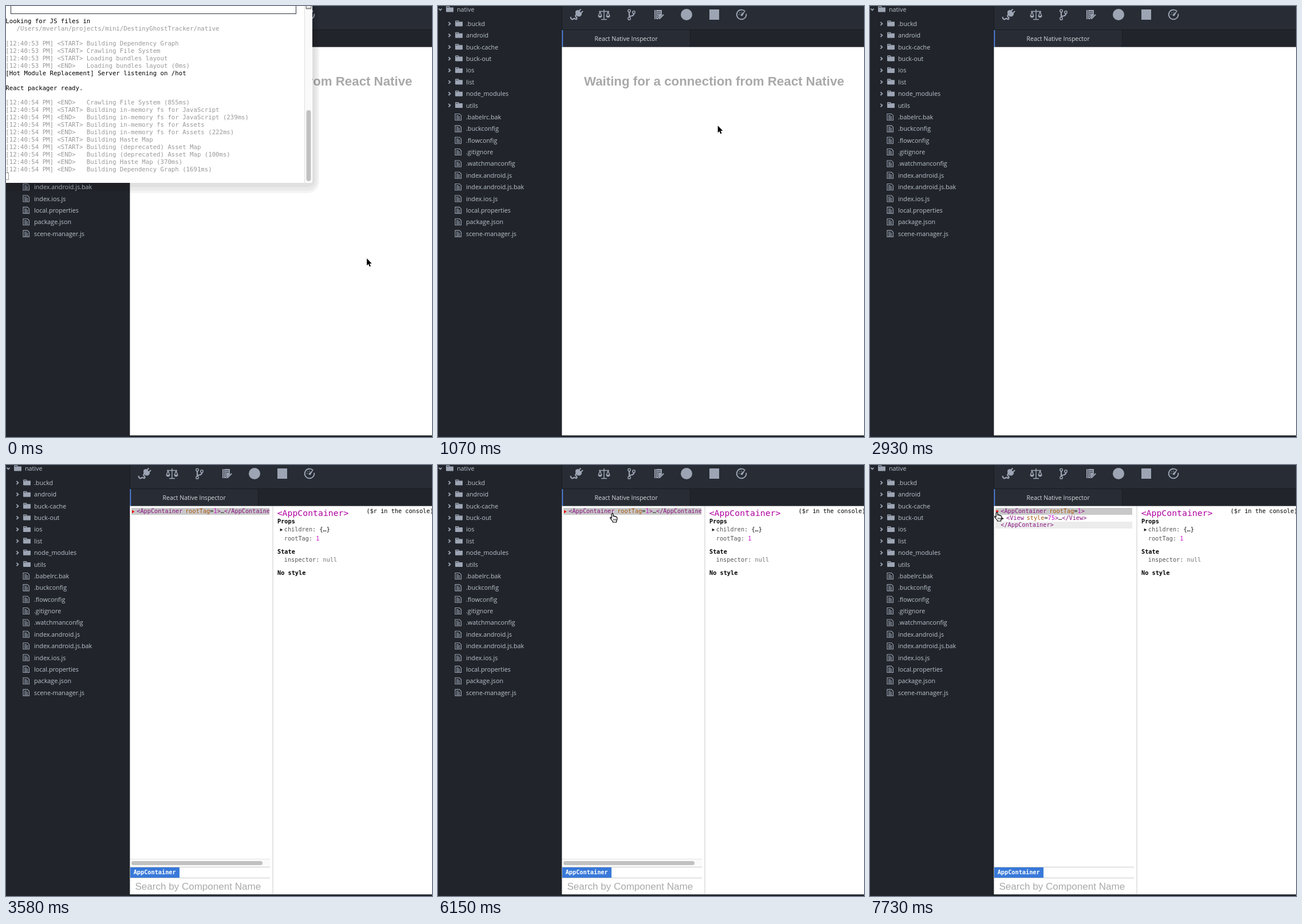
Recreate the animation shown at these times as an HTML page with a canvas. Size 744 px wide and 753 px high, loop 8000 ms.

```html
<!DOCTYPE html>
<html lang="en">
<head>
<meta charset="utf-8">
<title>Inspector</title>
<style>
html, body { margin: 0; width: 100%; height: 100%; overflow: hidden; background: #21252b; }
canvas { display: block; }
</style>
</head>
<body>
<canvas id="stage" width="744" height="753"></canvas>
<script>
const ctx = document.getElementById('stage').getContext('2d');
const LOOP = 8000;
const UI = '"Open Sans", "Noto Sans", sans-serif';
const MONO = '"DejaVu Sans Mono", monospace';
const SANS = '"Liberation Sans", Arial, sans-serif';
const CODE = `10.24px ${MONO}`;
const CODE_BOLD = `bold ${CODE}`;
const TAG = '#881280', ATTR = '#a85a10', VALUE = '#d010d0', ICON = '#9da5b4';

const FOLDERS = ['.buckd', 'android', 'buck-cache', 'buck-out', 'ios', 'list', 'node_modules', 'utils'];
const FILES = ['.babelrc.bak', '.buckconfig', '.flowconfig', '.gitignore', '.watchmanconfig',
  'index.android.js', 'index.android.js.bak', 'index.ios.js', 'local.properties',
  'package.json', 'scene-manager.js'];

// Lines starting with "!" are black
const LOG = `!Looking for JS files in
   /Users/mverlan/projects/mini/DestinyGhostTracker/native

[12:40:53 PM] <START> Building Dependency Graph
[12:40:53 PM] <START> Crawling File System
[12:40:53 PM] <START> Loading bundles layout
[12:40:53 PM] <END>   Loading bundles layout (0ms)
![Hot Module Replacement] Server listening on /hot

!React packager ready.

[12:40:54 PM] <END>   Crawling File System (855ms)
[12:40:54 PM] <START> Building in-memory fs for JavaScript
[12:40:54 PM] <END>   Building in-memory fs for JavaScript (239ms)
[12:40:54 PM] <START> Building in-memory fs for Assets
[12:40:54 PM] <END>   Building in-memory fs for Assets (222ms)
[12:40:54 PM] <START> Building Haste Map
[12:40:54 PM] <START> Building (deprecated) Asset Map
[12:40:54 PM] <END>   Building (deprecated) Asset Map (100ms)
[12:40:54 PM] <END>   Building Haste Map (370ms)
[12:40:54 PM] <END>   Building Dependency Graph (1691ms)`.split('\n');

const ARROW = new Path2D('M.7 1V13.4L3.5 10.8L5.4 15.3L7.5 14.4L5.6 10H9.3Z');
const HAND = new Path2D('M3.2 9V2Q3.3 .6 4.5 .6Q5.8 .7 5.9 2V5.6Q6.2 4.8 7.2 4.9Q8.3 5 8.4 6.1' +
  'Q8.9 5.4 9.8 5.6Q10.7 5.9 10.8 6.9Q11.3 6.4 12 6.8Q12.8 7.2 12.8 8.4V10.5Q12.7 12.3 11.6 14V16H5.4V14.6' +
  'Q3.6 13 2.3 10.8L.8 8.9Q.4 7.8 1.2 7.4Q2.2 7.1 3.2 9Z');

function rect(x, y, w, h, color) {
  ctx.fillStyle = color;
  ctx.fillRect(x, y, w, h);
}

function round(x, y, w, h, r, color) {
  ctx.fillStyle = color;
  ctx.beginPath();
  ctx.roundRect(x, y, w, h, r);
  ctx.fill();
}

function text(str, x, y, font, color) {
  ctx.font = font;
  ctx.fillStyle = color;
  ctx.fillText(str, x, y);
  return x + ctx.measureText(str).width;
}

// Consecutive pieces: string, color, string, color, ...
function run(x, y, ...parts) {
  for (let i = 0; i < parts.length; i += 2) x = text(parts[i], x, y, CODE, parts[i + 1]);
  return x;
}

function shape(x, y, d, color, width) {
  ctx.save();
  ctx.translate(x, y);
  const path = new Path2D(d);
  if (width) {
    ctx.strokeStyle = color;
    ctx.lineWidth = width;
    ctx.stroke(path);
  } else {
    ctx.fillStyle = color;
    ctx.fill(path);
  }
  ctx.restore();
}

function folder(x, y) {
  shape(x, y, 'M0 -4.5Q0 -5.5 1 -5.5H5.5Q6.5 -5.5 6.5 -4.5V-3.5H13V3.5Q13 4.5 12 4.5H1Q0 4.5 0 3.5Z', ICON);
  rect(x + 1.2, y - 4, 4, 0.9, '#21252b');
}

function sidebar() {
  const font = `500 10.75px ${UI}`, color = '#bcc3cf';
  rect(0, 0, 216, 753, '#21252b');
  rect(216, 0, 1, 753, '#181a1f');
  shape(4, 6, 'M-2.6 -1.3L0 1.4L2.6 -1.3', ICON, 1.7);
  folder(14, 6);
  text('native', 33, 10, font, color);
  [...FOLDERS, ...FILES].forEach((name, i) => {
    const y = 31 + i * 20.37;
    if (i < FOLDERS.length) {
      shape(20, y, 'M-1.6 -2.8L1.4 0L-1.6 2.8', ICON, 1.8);
      folder(30, y);
    } else {
      shape(35, y, 'M-5 -5.5H2.5L5.5 -2.5V5.5H-5Z', ICON, 1.1);
      shape(35, y, 'M-3 -2.5H1M-3 -.5H3.5M-3 1.5H3.5M-3 3.5H3.5', ICON, 1);
    }
    text(name, 49, y + 4, font, color);
  });
}

function toolbar() {
  rect(217, 0, 527, 41, '#282c34');
  rect(217, 41, 527, 31, '#21252b');
  rect(217, 41, 527, 1, '#181a1f');
  rect(217, 42, 223, 30, '#282c34');
  rect(440, 42, 1, 30, '#181a1f');
  rect(216.5, 42, 1.7, 30, '#568af2');
  text('React Native Inspector', 273.5, 61, `500 10.55px ${UI}`, '#d7dae0');

  // plug
  shape(242, 15, 'M-10.5 4Q-9.5 9.5 -6 8Q-4 6 -2 7.8Q1.5 9 0 5Q-3 3 -1 .5L1 -1', ICON, 2.2);
  shape(242, 15, 'M-1.5 -6.5Q1.5 -9 4 -7.5L9 -2Q9.5 1 6.5 3Q3 4.5 0 2Q-3 -2 -1.5 -6.5Z', ICON);
  shape(242, 15, 'M4 -6L7.5 -9.5M7.5 -2.5L11 -6', ICON, 2);
  // scales
  shape(290, 15, 'M0 -9V8M-5 8.4H5M-9 -5.5H9M-7 -5L-10 3M-7 -5L-4 3M7 -5L4 3M7 -5L10 3', ICON, 1.5);
  shape(290, 15, 'M-10.5 2H-3.5Q-4 5.5 -7 5.5Q-10 5.5 -10.5 2ZM3.5 2H10.5Q10 5.5 7 5.5Q4 5.5 3.5 2Z', ICON);
  // branch
  shape(338, 15, 'M-4 -4.5V5M4 -1.5Q4 2 -.5 2.5Q-4 3 -4 5', ICON, 2.2);
  for (const [x, y] of [[-4, -6.5], [4, -4], [-4, 7]]) {
    ctx.beginPath();
    ctx.arc(338 + x, 15 + y, 2.2, 0, 7);
    ctx.lineWidth = 1.5;
    ctx.strokeStyle = ICON;
    ctx.fillStyle = '#282c34';
    ctx.fill();
    ctx.stroke();
  }
  // checklist
  shape(386, 15, 'M-8 -8H5V1L1 5L-1.5 2.5L-3.5 4.5L0 8H-8Z', ICON);
  shape(386, 15, 'M-5.5 -8V8M-4 -5H3.5M-4 -2H3.5M-4 1H-.5', '#282c34', 1.1);
  shape(386, 15, 'M-1.5 4L1.2 6.7L8 0', ICON, 2.2);
  // plain marks
  round(424, 5, 20, 20, 10, ICON);
  rect(474, 6, 17, 18, ICON);
  // gauge
  shape(530, 15, 'M6 -5.8A8.3 8.3 0 1 0 8.2 -1.4', ICON, 1.9);
  shape(530, 15, 'M-1.8 .2L7.5 -7.5L1.6 2.2Q-.8 3 -1.8 .2Z', ICON);
  shape(530, 15, 'M-5 0H-3.6M-3.5 -3.6L-2.6 -2.7M0 -5V-3.6', ICON, 1.3);
}

function tree(open) {
  ctx.save();
  ctx.beginPath();
  ctx.rect(217, 72, 243, 616);
  ctx.clip();
  rect(219, 75, open ? 239 : 241, 12, '#c8c8c8');
  if (open) rect(219, 99, 239, 12, '#ececec');
  shape(222, 81.5, open ? 'M-2.8 -2H2.8L0 3Z' : 'M-2 -2.8V2.8L2.8 0Z', '#f00c0c');
  let x = run(228.3, 84, '<AppContainer', TAG);
  x = run(x + 4.8, 84, 'rootTag', ATTR, '=', '#222', '1', VALUE, '>', TAG);
  if (open) {
    shape(231.5, 93.5, 'M-2 -2.6V2.6L2.6 0Z', '#333');
    x = run(238, 96, '<View', TAG);
    run(x + 4.8, 96, 'style', ATTR, '=', '#222', '75', VALUE, '>', TAG, '…', '#222', '</View>', TAG);
    run(228.3, 108, '</AppContainer>', TAG);
  } else {
    run(x, 84, '…', '#222', '</AppContainer>', TAG);
  }
  ctx.restore();

  if (!open) {
    rect(217, 688, 244, 14, '#fafafa');
    rect(217, 688, 244, 1, '#e4e4e4');
    round(219, 692, 229, 7, 3.5, '#c1c1c1');
  }
  rect(217, 702, 244, 1, '#cbcbcb');
  rect(217, 721, 244, 1, '#cbcbcb');
  rect(217, 703, 86, 18, '#3879d9');
  text('AppContainer', 222.7, 715, CODE_BOLD, '#fff');
  text('Search by Component Name', 225.5, 742, `17.05px ${SANS}`, '#a9a9a9');
}

function details() {
  rect(465.5, 72, 1, 678, '#ccc');
  text('<AppContainer>', 473.7, 89, `14.8px ${MONO}`, '#b0009f');
  text('($r in the console)', 629.5, 84, CODE, '#000');
  text('Props', 474, 102, CODE_BOLD, '#000');
  shape(480.5, 113.3, 'M-1.8 -2.5V2.5L2.8 0Z', '#111');
  run(485.8, 116, 'children: ', '#555', '{…}', '#111');
  run(485.8, 131.5, 'rootTag: ', '#555', '1', VALUE);
  text('State', 474, 154.5, CODE_BOLD, '#000');
  run(485.8, 168.5, 'inspector: ', '#555', 'null', '#777');
  text('No style', 474, 191.5, CODE_BOLD, '#000');
}

function terminal() {
  for (const grow of [12, 9, 5]) round(-20, -20, 555 + grow, 329 + grow * 1.5, 8 + grow, 'rgba(0,0,0,.045)');
  round(-20, -20, 555, 329, 4, '#fff');
  ctx.strokeStyle = '#2c3440';
  ctx.lineWidth = 1;
  ctx.strokeRect(8.5, -5, 498, 18.5);
  rect(521, 0, 1, 309, '#dedede');
  rect(522, 0, 12, 309, '#fafafa');
  round(523.5, -4, 10, 9.5, 1, '#888');
  rect(525, 0, 7, 3.5, '#eee');
  round(524.5, 182, 8, 124, 4, '#c1c1c1');
  LOG.forEach((line, i) => {
    const dark = line[0] === '!';
    text(dark ? line.slice(1) : line, -0.7, 30 + i * 12.95, `10.7px ${MONO}`, dark ? '#000' : '#999');
  });
  ctx.strokeStyle = '#999';
  ctx.strokeRect(-1.5, 291.5, 6, 12);
}

// [start, x, y, shape]
const STOPS = [
  [0, 629.5, 440, ARROW], [770, 618, 400, ARROW], [850, 575, 290, ARROW], [920, 525, 190, ARROW],
  [1000, 498, 165, ARROW], [1070, 488, 208, ARROW], [2810, 0, 0, null], [3970, 478.5, 91, ARROW],
  [4270, 335, 76, HAND], [4450, 324, 75.5, HAND], [6930, 219, 87, ARROW],
  [7290, 218, 86, ARROW], [7350, 218, 84, HAND], [7400, 217, 83, HAND], [7460, 217, 82, HAND]
];

function cursorAt(t) {
  if (t >= 6150 && t < 6930) {
    const step = Math.floor((t - 6150) / 60), p = step / 13;
    const ease = 1 - (1 - p) ** 1.6;
    return [t, 300 - 81 * ease, 84 + 3 * p + 6 * Math.sin(Math.PI * p), step < 2 ? HAND : ARROW];
  }
  return STOPS.findLast(stop => stop[0] <= t);
}

function cursor(t) {
  const [, x, y, path] = cursorAt(t);
  if (!path) return;
  ctx.save();
  ctx.translate(x, y);
  ctx.lineJoin = 'round';
  if (path === ARROW) {
    ctx.strokeStyle = '#fff';
    ctx.lineWidth = 1.6;
    ctx.stroke(path);
    ctx.fillStyle = '#000';
    ctx.fill(path);
  } else {
    ctx.fillStyle = '#fff';
    ctx.fill(path);
    ctx.strokeStyle = '#000';
    ctx.lineWidth = 1.2;
    ctx.stroke(path);
    ctx.lineWidth = 0.8;
    ctx.stroke(new Path2D('M6.6 10V13M8.6 10V13M10.6 10V13'));
  }
  ctx.restore();
}

function draw(t) {
  rect(0, 0, 744, 753, '#21252b');
  sidebar();
  toolbar();
  rect(216.4, 71.7, 527.6, 678.5, '#fff');
  if (t < 2810) {
    text('Waiting for a connection from React Native', 255, 139, `bold 22.27px ${SANS}`, '#a9a9a9');
  } else if (t >= 3580) {
    tree(t >= 7670);
    details();
  }
  if (t < 420) terminal();
  cursor(t);
}

const start = performance.now();
function tick() {
  draw((performance.now() - start) % LOOP);
  requestAnimationFrame(tick);
}
tick();
</script>
</body>
</html>
```
